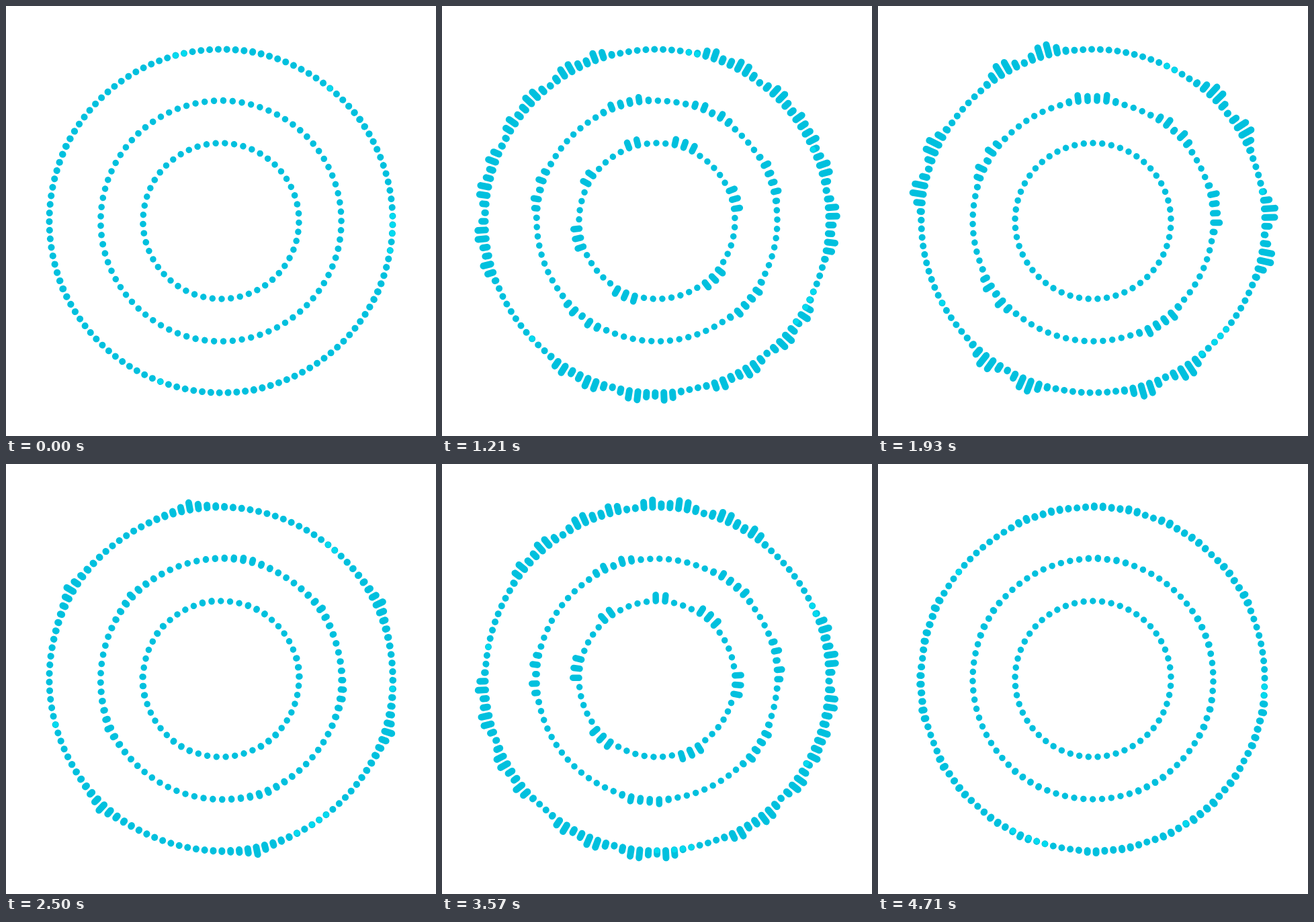
An HTML page with a canvas for the animation above (4780 ms loop, 640 by 640 pixels).

```html
<!DOCTYPE html>
<html lang="en">
<head>
<meta charset="utf-8">
<title>Circular equalizer</title>
<style>
  html, body { margin: 0; height: 100%; overflow: hidden; background: #fff; }
  canvas { display: block; width: 100vmin; height: 100vmin; }
</style>
</head>
<body>
<canvas id="stage" width="640" height="640"></canvas>
<script>
const ctx = document.getElementById('stage').getContext('2d');
const LOOP = 4780, STEPS = 67, BEAT = STEPS / 2;
const COLOR = '#00c0de', GLOW = '#00dcf0';

// The spectrum of each ring is mirrored around its centers, given as bar positions
const OUTER = { radius: 255.5, count: 125, width: 10, start: 10.6, centers: [0, 15, 36, 55, 82, 99] };
const MIDDLE = { radius: 179, count: 81, width: 9.5, start: 1.1, centers: [0, 9.5, 23.5, 43, 58, 71.5] };
const INNER = { radius: 116, count: 53, width: 9.5, start: -2.5, centers: [4, 12, 21, 31, 39, 45.5, 51.5] };
const BRIGHT = [-9, -8, 10, 27, 28, 29, 31, 66];

// step, turn of the two large rings, turn of the inner ring, in degrees
const TURNS = [
  [0, 0, -1.4], [9, 13.5, 0], [17, 26, -4.8], [27, 40.8, 2.5],
  [43, 67, 2.3], [50, 80.1, 15.2], [66, 107.9, 16]
];

const pulse = (x, at, width, height) => height * Math.exp(-(((x - at) / width) ** 2));

function turnsAt(step) {
  const i = Math.max(1, TURNS.findIndex(key => key[0] >= step));
  const a = TURNS[i - 1], b = TURNS[i];
  const p = (step - a[0]) / (b[0] - a[0]);
  return [1, 2].map(n => a[n] + (b[n] - a[n]) * p);
}

function distance(ring, bar) {
  return Math.min(...ring.centers.map(center => {
    const d = Math.abs(bar - center);
    return Math.min(d, ring.count - d);
  }));
}

function drawBar(ring, angle, length, width, color) {
  const x = Math.sin(angle), y = -Math.cos(angle);
  const end = ring.radius + length + .01;
  ctx.lineWidth = width;
  ctx.strokeStyle = color;
  ctx.beginPath();
  ctx.moveTo(x * ring.radius, y * ring.radius);
  ctx.lineTo(x * end, y * end);
  ctx.stroke();
}

function drawRing(ring, turn, lengthAt, bright = []) {
  const angle = i => (ring.start + turn + i * 360 / ring.count) * Math.PI / 180;
  for (let i = 0; i < ring.count; i++) {
    drawBar(ring, angle(i), lengthAt(distance(ring, i)), ring.width, COLOR);
  }
  for (const i of bright) drawBar(ring, angle(i), 0, 8, GLOW);
}

function draw(step) {
  const beat = step % BEAT;
  const spike = pulse(beat, 4, 2, 54) + pulse(beat, 10.2, 2, 60) + pulse(beat, 20.5, 1.5, 24);
  const near = pulse(beat, 7, 1.3, 9) + pulse(beat, 17, 3.5, 13) + pulse(beat, 27, 4, 17);
  const far = pulse(beat, 17, 3, 12) + pulse(beat, 32, 2, 4);
  const inner = 10 * Math.exp(-(((beat - 12) / 8.5) ** 4));
  const [turn, innerTurn] = turnsAt(step);

  ctx.setTransform(1, 0, 0, 1, 0, 0);
  ctx.fillStyle = '#fff';
  ctx.fillRect(0, 0, 640, 640);
  ctx.translate(320, 320);
  ctx.lineCap = 'round';

  drawRing(OUTER, turn, d =>
    spike * Math.exp(-d / 2) + pulse(d, 2.6, 1.7, near) + pulse(d, 6.3, 1.2, far), BRIGHT);
  drawRing(MIDDLE, turn, d => spike / 2 * Math.exp(-d / 2) + pulse(d, 1.2, 1.1, near * .6));
  drawRing(INNER, innerTurn, d => d <= 1 ? inner : 0);
}

function tick() {
  const time = performance.now() % LOOP;
  draw(Math.min(STEPS - 1, Math.floor((time + 4) * STEPS / LOOP)));
  requestAnimationFrame(tick);
}
tick();
</script>
</body>
</html>
```
